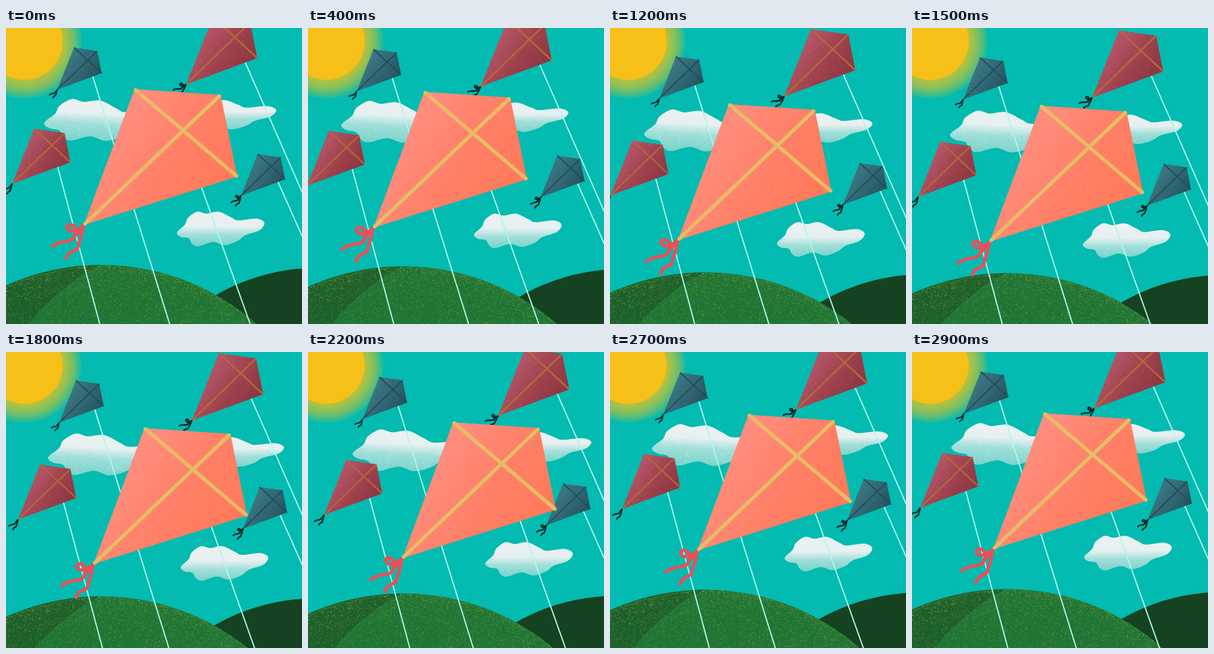
An HTML page with a canvas for the animation above (3000 ms loop, 480x480 px).

```html
<!DOCTYPE html>
<html lang="en">
<head>
<meta charset="utf-8">
<title>Kites</title>
<style>
  html, body { margin: 0; width: 100%; height: 100%; overflow: hidden; background: #03bbb0; }
  canvas { display: block; width: 480px; height: 480px; }
</style>
</head>
<body>
<canvas id="stage" width="480" height="480"></canvas>
<script>
const ctx = document.getElementById('stage').getContext('2d');
const LOOP = 3000, STEP = 100, TAU = Math.PI * 2;

function random(seed) {
  return () => {
    seed = (seed + 0x6d2b79f5) | 0;
    let v = Math.imul(seed ^ (seed >>> 15), 1 | seed);
    v = (v + Math.imul(v ^ (v >>> 7), 61 | v)) ^ v;
    return ((v ^ (v >>> 14)) >>> 0) / 4294967296;
  };
}

function linear(x0, y0, x1, y1, ...stops) {
  const g = ctx.createLinearGradient(x0, y0, x1, y1);
  stops.forEach(([at, color]) => g.addColorStop(at, color));
  return g;
}

function fill(path, color) {
  ctx.fillStyle = color;
  ctx.fill(path);
}

function stroke(path, color, width) {
  ctx.strokeStyle = color;
  ctx.lineWidth = width;
  ctx.stroke(path);
}

function disc(x, y, r) {
  const path = new Path2D();
  path.arc(x, y, r, 0, TAU);
  return path;
}

// Closed Catmull-Rom curve through a flat list of points
function blob(p) {
  const n = p.length / 2, path = new Path2D();
  const at = i => [p[((i + n) % n) * 2], p[((i + n) % n) * 2 + 1]];
  path.moveTo(...at(0));
  for (let i = 0; i < n; i++) {
    const [a, b, c, d] = [at(i - 1), at(i), at(i + 1), at(i + 2)];
    path.bezierCurveTo(
      b[0] + (c[0] - a[0]) / 6, b[1] + (c[1] - a[1]) / 6,
      c[0] - (d[0] - b[0]) / 6, c[1] - (d[1] - b[1]) / 6, c[0], c[1]);
  }
  path.closePath();
  return path;
}

// Specks inside a path; keep(u, v) is the chance at a relative position
function grain(path, [x, y, w, h], count, color, seed, keep) {
  const rnd = random(seed);
  ctx.save();
  ctx.clip(path);
  ctx.fillStyle = color;
  for (let i = 0; i < count; i++) {
    const u = rnd(), v = rnd();
    if (rnd() < keep(u, v)) ctx.fillRect(x + u * w, y + v * h, 1, 1);
  }
  ctx.restore();
}

// Every part swings on its own ellipse
function swing(angle, ax, ay, draw) {
  ctx.save();
  ctx.translate(-ax * Math.sin(angle), ay * (1 - Math.cos(angle)));
  draw();
  ctx.restore();
}

// One outline, placed three times
const puff = blob([
  0, 34, 13, 21, 18, 10, 33, 0, 48, 3, 68, 0, 88, 9, 100, 14, 129, 11, 142, 18,
  134, 30, 111, 38, 99, 47, 78, 54, 58, 49, 35, 56, 25, 52, 19, 43, 7, 41]);
const clouds = [
  { x: 64, y: 113, sx: 1.3, sy: 1.2, turn: .052, fade: .42, ax: 10.7, ay: 9.4 },
  { x: 279, y: 117, sx: 1.12, sy: .88, turn: 0, fade: .48, ax: 21.5, ay: 11.8 },
  { x: 277, y: 298, sx: 1, sy: 1, turn: 0, fade: .52, ax: 10.5, ay: 9.4 }
];

function drawCloud({ x, y, sx, sy, turn, fade }, i) {
  ctx.translate(x, y);
  ctx.rotate(turn);
  ctx.scale(sx, sy);
  fill(puff, linear(0, 0, 0, 56,
    [0, '#ecf1f2'], [fade - .1, '#e6f0f0'], [fade + .15, '#9fded8'], [1, '#76d3cb']));
  grain(puff, [0, 0, 143, 56], 1600, 'rgba(255,255,255,.22)', 20 + i, (u, v) => v < fade ? .1 : 1.3 - v);
}

// Corners relative to the tip: top left, top right, right
const slim = [[.42, -1.05], [1, -.967], [1.11, -.41]];
const wide = [[.372, -.993], [1, -.951], [1.122, -.354]];

const ribbons = new Path2D('M0 0C-6 10-16 17-16 21C-20 27-30 26-37 28C-44 30-48 32-51 35' +
  'M0 0C-4 9-2 18-7 26C-10 31-7 36-12 40C-21 43-25 46-28 54');
const loop = new Path2D('M0 0C-6 6-18 13-25 8C-30 2-25-2-19 0C-12 3-11 11-16 21');

const red = { shape: slim, sheet: ['#b25365', '#9e414d', '#8c3741'], stick: '#b3683c', speck: 'rgba(215,125,135,.32)', ribbon: '#12282c' };
const teal = { shape: slim, sheet: ['#3a7580', '#2f6673', '#28535f'], stick: '#1f4955', speck: 'rgba(110,165,170,.25)', ribbon: '#12282c' };
const coral = { shape: wide, sheet: ['#ff8b7b', '#ff7f66', '#ff7a5a'], stick: '#e8bb66', speck: 'rgba(255,185,165,.3)', ribbon: '#ee4d57' };

// cord: position along the lower edge; lean: its x per y; tail: scale and turn
const kites = [
  { ...red, x: 292, y: 91.5, size: 104, cord: .832, lean: .4385, tail: .36, turn: .2, loop, ax: 16.3, ay: 10.8 },
  { ...red, x: 10, y: 252.5, size: 85, cord: .782, lean: .268, tail: .3, turn: 0, ax: 16.2, ay: 10.6 },
  { ...teal, x: 83, y: 100, size: 65, cord: .8, lean: .3105, tail: .24, turn: 0, ax: 5.5, ay: 8 },
  { ...teal, x: 381, y: 272, size: 64.5, cord: .842, lean: .443, tail: .31, turn: 0, loop, ax: 5.5, ay: 8.1 },
  { ...coral, x: 126, y: 319.5, size: 222, cord: .768, lean: .356, tail: 1, turn: 0, loop, ax: 27, ay: 13.5 }
];

kites.forEach(k => {
  const [a, b, c] = k.shape.map(p => p.map(v => v * k.size));
  const d = [0, 0];
  const stick = (p, q) => {
    const inset = .01, mix = t => p.map((v, i) => v + (q[i] - v) * t);
    return `M${mix(inset)}L${mix(1 - inset)}`;
  };
  k.path = new Path2D(`M${a}L${b}L${c}L${d}Z`);
  k.frame = new Path2D(stick(a, c) + stick(b, d));
  k.box = [0, a[1], c[0], -a[1]];
  const [x, y] = c.map(v => v * k.cord);
  k.line = new Path2D(`M${x} ${y}L${x + k.lean * 500} ${y + 500}`);
});

function drawTail(k) {
  const width = k.tail * 4 + 1.2;
  ctx.save();
  ctx.rotate(k.turn);
  ctx.scale(k.tail, k.tail);
  stroke(ribbons, k.ribbon, width / k.tail);
  if (k.loop) stroke(k.loop, k.ribbon, width / k.tail);
  ctx.restore();
}

function drawKite(k, i) {
  const [, y, w, h] = k.box;
  ctx.translate(k.x, k.y);
  stroke(k.line, '#aef8ec', 2);
  drawTail(k);
  fill(k.path, linear(w * .25, y + h * .3, w * .85, y + h * .75,
    [0, k.sheet[0]], [.5, k.sheet[1]], [1, k.sheet[2]]));
  grain(k.path, k.box, w * h * .15, k.speck, 40 + i, (u, v) => 1.15 - u * .9 - v * .35);
  stroke(k.frame, k.stick, k.size * .027);
}

const hill = { x: 155, y: 762.3, r: 378 };
const nearHill = disc(hill.x, hill.y, hill.r);
const farHill = disc(505, 719, 330);
const shade = new Path2D('M152 370V384Q88 418 36 480L0 525H-40V370Z');

function drawHill() {
  fill(nearHill, '#1f7535');
  ctx.save();
  ctx.clip(nearHill);
  fill(shade, '#1c602c');
  ctx.restore();
  const rnd = random(7);
  for (let i = 0; i < 3600; i++) {
    const x = rnd() * 420, depth = 1 + 95 * rnd() ** 1.6;
    const y = hill.y - Math.sqrt(hill.r ** 2 - (x - hill.x) ** 2) + depth;
    ctx.fillStyle = `rgba(158,166,66,${.2 + rnd() * .55})`;
    ctx.fillRect(x, y, 1.1, 1.1);
  }
}

function drawSun() {
  for (let r = 92; r > 62; r -= 4) fill(disc(30, 22, r), 'rgba(246,192,25,.15)');
  fill(disc(30, 22, 62), '#f6c018');
}

function render(angle) {
  ctx.fillStyle = '#03bbb0';
  ctx.fillRect(0, 0, 480, 480);
  drawSun();
  clouds.forEach((c, i) => swing(angle, c.ax, c.ay, () => drawCloud(c, i)));
  swing(angle, -5, 5.8, () => fill(farHill, '#154220'));
  swing(angle, 0, 6.6, drawHill);
  kites.forEach((k, i) => swing(angle, k.ax, k.ay, () => drawKite(k, i)));
}

ctx.lineCap = ctx.lineJoin = 'round';
let shown = -1;
function tick() {
  const step = Math.floor((performance.now() % LOOP) / STEP);
  if (step !== shown) render((shown = step) * STEP / LOOP * TAU);
  requestAnimationFrame(tick);
}
tick();
</script>
</body>
</html>
```
